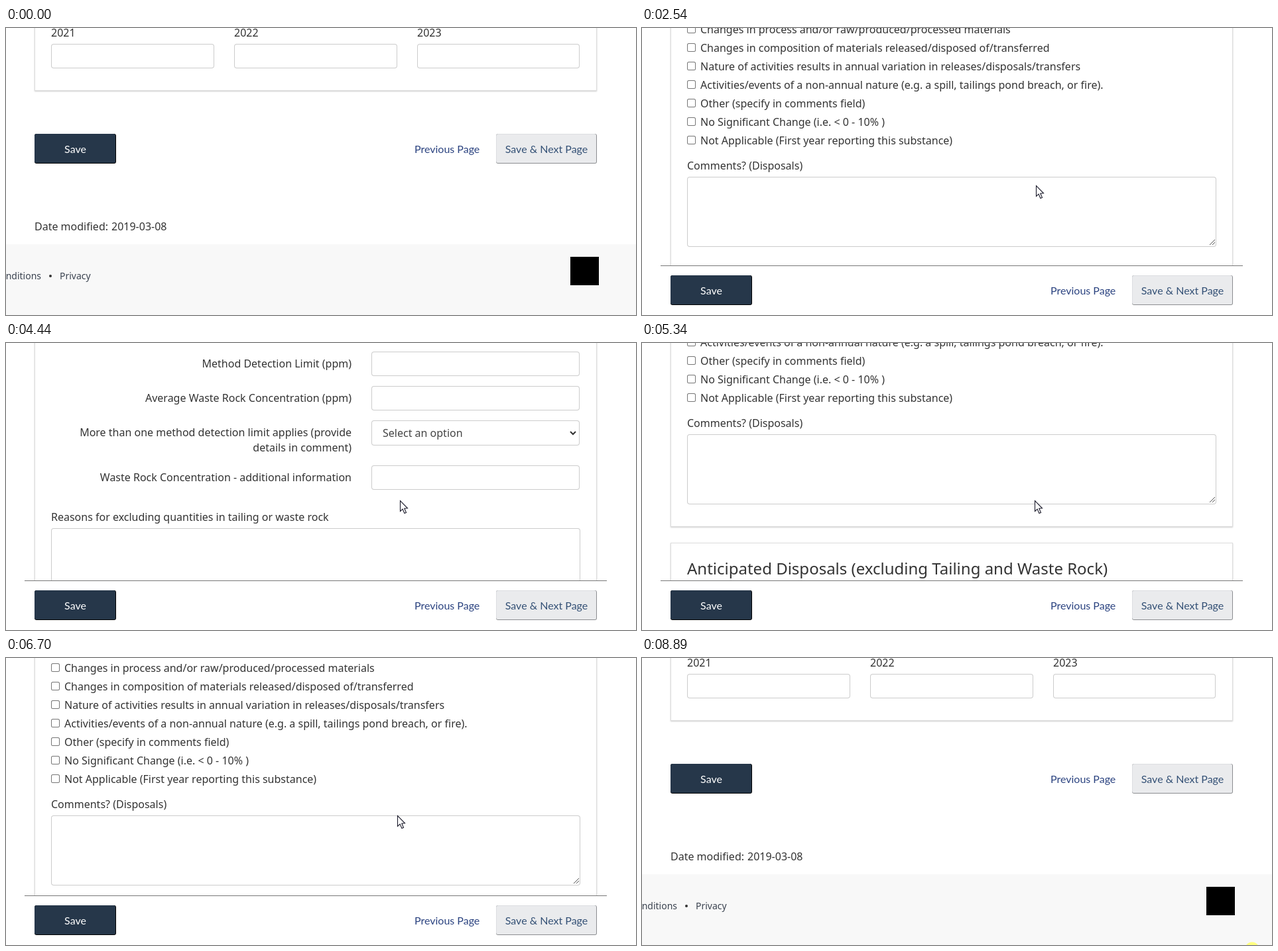
Write an HTML page with a canvas that moves like this. It is 950 px wide and 434 px high and loops after 8960 ms.

```html
<!DOCTYPE html>
<html lang="en">
<head>
<meta charset="utf-8">
<title>Form scroll</title>
<style>
  html, body { margin: 0; width: 100%; height: 100%; overflow: hidden; background: #fff; }
  canvas { display: block; }
</style>
</head>
<body>
<canvas id="stage" width="950" height="434"></canvas>
<script>
const ctx = document.getElementById('stage').getContext('2d');
const LOOP = 8960;
const BAR_STICK = 214; // scroll distance at which the button bar sticks to the bottom
const SANS = '"Noto Sans", sans-serif';
const LATO = 'Lato, sans-serif';
const ARROW = new Path2D('M0 0V16L3.6 12.6 6.4 19 9 18 6.3 11.7 11 11.4Z');

// Each move eases to a new value; scroll is the distance up from the page bottom.
const scrollMoves = [
  { from: 690, until: 1310, to: [194] },
  { from: 1520, until: 1780, to: [291] },
  { from: 1920, until: 3479, to: [1067] },
  { from: 3640, until: 4640, to: [1295] },
  { from: 4640, until: 5829, to: [0] },
  { from: 6035, until: 6920, to: [679] },
  { from: 7040, until: 7720, to: [0] }
];

const pointerMoves = [
  { from: 130, until: 550, to: [477, 257] },
  { from: 690, until: 1310, to: [594, 238] },
  { from: 4440, until: 6240, to: [590, 238] },
  { from: 7100, until: 7860, to: [590, 242] },
  { from: 7930, until: 8350, to: [690, 123] },
  { from: 8350, until: 8890, to: [920, 440] }
];

const reasons = [
  'Increase in production levels',
  'Decrease in production levels',
  'Changes in estimation methods',
  'Pollution prevention activities',
  'Changes in on-site treatment',
  'Changes in process and/or raw/produced/processed materials',
  'Changes in composition of materials released/disposed of/transferred',
  'Nature of activities results in annual variation in releases/disposals/transfers',
  'Activities/events of a non-annual nature (e.g. a spill, tailings pond breach, or fire).',
  'Other (specify in comments field)',
  'No Significant Change (i.e. < 0 - 10% )',
  'Not Applicable (First year reporting this substance)'
];

function follow(start, moves, t) {
  return moves.reduce((pos, { from, until, to }) => {
    const k = Math.min(1, Math.max(0, (t - from) / (until - from)));
    const eased = k * k * (3 - 2 * k);
    return pos.map((v, i) => v + (to[i] - v) * eased);
  }, start).map(Math.round);
}

function text(str, x, y, { size = 16, color = '#333', font = SANS, align = 'left' } = {}) {
  ctx.font = `${size}px ${font}`;
  ctx.fillStyle = color;
  ctx.textAlign = align;
  ctx.fillText(str, x, y);
}

function rect(x, y, w, h, color) {
  ctx.fillStyle = color;
  ctx.fillRect(x, y, w, h);
}

function roundRect(x, y, w, h, radius, fill) {
  ctx.beginPath();
  ctx.roundRect(x, y, w, h, radius);
  ctx.fillStyle = fill;
  ctx.fill();
}

function disc(x, y, r, color) {
  ctx.beginPath();
  ctx.arc(x, y, r, 0, 2 * Math.PI);
  ctx.fillStyle = color;
  ctx.fill();
}

function strokePath(path, color, width = 1) {
  ctx.strokeStyle = color;
  ctx.lineWidth = width;
  ctx.stroke(new Path2D(path));
}

function box(x, y, w, h, border = '#ccc', radius = 4) {
  roundRect(x, y, w, h, radius, border);
  roundRect(x + 1, y + 1, w - 2, h - 2, Math.max(0, radius - 1), '#fff');
}

function card(top, bottom) {
  ctx.save();
  ctx.shadowColor = 'rgba(0,0,0,.2)';
  ctx.shadowBlur = 2;
  ctx.shadowOffsetY = 1;
  rect(43, top, 848, bottom - top, '#fff');
  ctx.restore();
  box(43, top, 848, bottom - top, '#ddd', 0);
}

function heading(str, y) {
  text(str, 68, y, { size: 24 });
  rect(68, y + 11, 798, 1, '#e5e5e5');
}

function textarea(y) {
  box(68, y, 798, 106);
  strokePath(`M856 ${y + 103}l8 -8m-4 8l4 -4`, '#555');
}

function wasteRockCard() {
  card(-1700, -852);
  const rows = [
    ['Method Detection Limit (ppm)'],
    ['Average Waste Rock Concentration (ppm)'],
    ['More than one method detection limit applies (provide', 'details in comment)'],
    ['Waste Rock Concentration - additional information']
  ];
  let y = -1259;
  for (const lines of rows) {
    const isSelect = lines.length > 1;
    lines.forEach((line, i) => text(line, 521, y + 24 + 23 * i, { align: 'right' }));
    box(551, y, 314, isSelect ? 38 : 37);
    if (isSelect) {
      text('Select an option', 568, y + 25, { color: '#444' });
      strokePath(`M851 ${y + 17}l4 4l4 -4`, '#333', 2);
    }
    y += isSelect ? 68 : 52;
  }
  text('Reasons for excluding quantities in tailing or waste rock', 68, -1003);
  textarea(-992);
}

function reasonsCard() {
  card(-828, -197);
  heading('Reasons for Changes in Quantities Recycled from Previous Years', -780);
  text('Select the applicable reason or reasons', 68, -728);
  reasons.forEach((reason, i) => {
    const y = -694 + 28 * i;
    box(68, y - 13, 13, 13, '#767676', 2.5);
    text(reason, 88, y);
  });
  text('Comments? (Disposals)', 68, -348);
  textarea(-337);
}

function disposalsCard() {
  card(-173, 95);
  heading('Anticipated Disposals (excluding Tailing and Waste Rock)', -125);
  rect(78, -90, 6, 63, '#269abc');
  disc(81, -59, 16, '#fff');
  disc(81, -59, 12.5, '#269abc');
  text('i', 81, -52, { size: 20, color: '#fff', font: '"Noto Serif", serif', align: 'center' });
  text('Enter the anticipated disposal quantities (Tonnes) for the years indicated below.',
    114, -58, { color: '#111' });
  for (let i = 0; i < 3; i++) {
    const x = 68 + 276 * i;
    text(2021 + i, x, 13);
    box(x, 24, i < 2 ? 246 : 245, 37);
  }
}

function footer() {
  text('Date modified:', 43, 306);
  text('2019-03-08', 159, 306);
  rect(0, 327, 950, 107, '#f8f8f8');
  const small = { size: 14, color: '#3b4350' };
  text('Terms and Conditions', 53, 380, { ...small, align: 'right' });
  disc(67, 375, 2, '#333');
  text('Privacy', 81, 380, small);
  rect(851, 346, 43, 43, '#000');
}

function button(label, x, y, w, { fill, light, dark, color }) {
  roundRect(x, y, w, 45, 3, dark);
  roundRect(x, y, w - 1, 44, 3, light);
  roundRect(x + 1, y + 1, w - 2, 43, 2, fill);
  text(label, x + w / 2, y + 29, { font: LATO, align: 'center', color });
}

function buttonBar(scroll) {
  const y = 160 + Math.min(scroll, BAR_STICK);
  if (scroll > BAR_STICK) {
    rect(0, 359, 950, 75, '#fff');
    rect(28, 359, 878, 1, '#777');
  }
  button('Save', 43, y, 123,
    { fill: '#26374a', light: '#26374a', dark: '#000', color: '#fff' });
  text('Previous Page', 616, y + 29, { font: LATO, color: '#2b4380' });
  button('Save & Next Page', 739, y, 152,
    { fill: '#eaebed', light: '#dcdee1', dark: '#8b8d90', color: '#335075' });
}

function pointer([x, y]) {
  ctx.save();
  ctx.translate(x + .5, y + .5);
  ctx.fillStyle = '#fff';
  ctx.fill(ARROW);
  ctx.strokeStyle = '#1a1a2a';
  ctx.lineWidth = 1.1;
  ctx.stroke(ARROW);
  ctx.restore();
}

function draw() {
  const t = performance.now() % LOOP;
  const [scroll] = follow([0], scrollMoves, t);
  rect(0, 0, 950, 434, '#fff');
  ctx.save();
  ctx.translate(0, scroll);
  wasteRockCard();
  reasonsCard();
  disposalsCard();
  footer();
  ctx.restore();
  buttonBar(scroll);
  if (t >= 8890) disc(920, 440, 10.6, '#ffff80');
  if (t >= 130) pointer(follow([760, 374], pointerMoves, t));
  requestAnimationFrame(draw);
}
draw();
</script>
</body>
</html>
```
